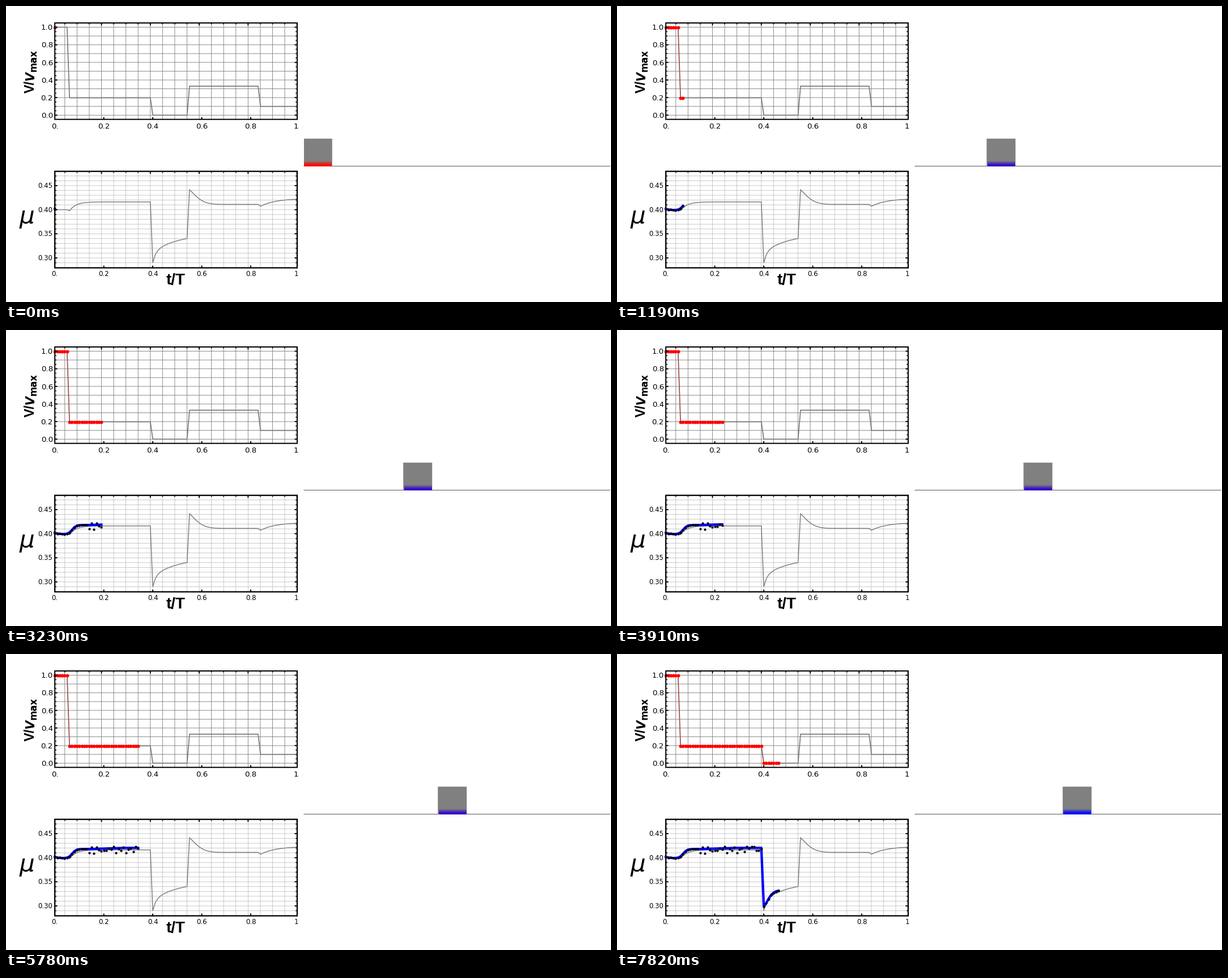
A matplotlib script that plays this animation: 1068x524 px, repeating every 7.99 s.

```python
import numpy as np
import matplotlib.pyplot as plt
from matplotlib.animation import FuncAnimation
from matplotlib.patches import Rectangle

W, H, DPI = 1068, 524, 64
FRAMES, STEP_MS = 47, 170
X0, X1, T_SCALE = 86.2, 514, 4.323      # plot edges, pixels per time step
GRID_X = 103.8 + 21.57 * np.arange(20)
GREY = "#808080"

plt.rcParams["path.snap"] = False       # keep sub-pixel positions


def pt(px):
    return px * 72 / DPI


fig = plt.figure(figsize=(W / DPI, H / DPI), dpi=DPI, facecolor="white")
ax = fig.add_axes([0, 0, 1, 1])
ax.set_xlim(0, W)
ax.set_ylim(H, 0)
ax.axis("off")


def line(x, y, color, width, z, **kw):
    kw.setdefault("solid_capstyle", "butt")
    return ax.plot(x, y, color=color, lw=pt(width), zorder=z, **kw)[0]


def label(x, y, text, size, font="DejaVu Sans", **kw):
    ax.text(x, y, text, fontsize=pt(size), family=font, va="baseline",
            rotation_mode="anchor", zorder=9, **kw)


def time_x(k):
    return X0 + T_SCALE * np.asarray(k)


def speed_y(v):
    return 193.3 - 155.8 * np.asarray(v)


def mu_y(m):
    return 360.6 - 853.4 * (np.asarray(m) - 0.4)


def panel(top, bottom, rows, grid_color, grid_w, frame_w):
    for x in GRID_X[GRID_X < X1]:
        line([x, x], [top, bottom], grid_color, grid_w, 1)
    for y in rows:
        line([X0, X1], [y, y], grid_color, grid_w, 1)
    ax.add_patch(Rectangle((X0, top), X1 - X0, bottom - top, fill=False,
                           ec="black", lw=pt(frame_w), zorder=8))


def ticks(top, bottom, major, minor):
    for ys, size, w in ((major, 4.5, 1.9), (minor, 2.8, 1.5)):
        for y in ys:
            line([X0, X0 + size], [y, y], "black", w, 8)
            line([X1 - size, X1], [y, y], "black", w, 8)
    for i, x in enumerate(GRID_X[GRID_X < X1]):
        size, w = (4.5, 1.9) if i % 4 == 3 else (2.8, 1.5)
        line([x, x], [top, top + size], "black", w, 8)
    for x in time_x([20, 40, 60, 80]):
        line([x, x], [bottom - 4, bottom], "black", 1.9, 8)


def time_labels(y, size):
    for i, text in enumerate(("0.", "0.2", "0.4", "0.6", "0.8")):
        label(time_x(20 * i), y, text, size, ha="center")
    label(512, y, "1", size, ha="center")


# Speed panel
speed_marks = np.arange(0, 1.01, 0.2)
panel(30, 200.7, speed_y(np.arange(0, 1.01, 0.1)), GREY, 0.9, 2)
ticks(30, 200.7, speed_y(speed_marks), speed_y(np.arange(0, 1.01, 0.05)))
time_labels(217, 13.4)
for v in speed_marks:
    label(83, speed_y(v) + 4.8, f"{v:.1f}", 13.4, ha="right")
bold_up = dict(weight="bold", rotation=90)
label(49.5, 154, "V/", 23.5, "Liberation Sans", **bold_up)
label(49.5, 132, "V", 20.7, style="italic", **bold_up)
label(54, 115.5, "max", 16.5, **bold_up)

# Friction panel
mu_marks = np.arange(0.30, 0.451, 0.05)
mu_rows = mu_y(np.arange(0.29, 0.471, 0.01))
panel(292.7, 463.5, mu_rows, "#b4b4b4", 0.7, 2.3)
ticks(292.7, 463.5, mu_y(mu_marks), mu_rows)
time_labels(478.3, 11.7)
for m in mu_marks:
    label(82.5, mu_y(m) + 4.2, f"{m:.2f}", 11.7, ha="right")
label(37, 385.5, "μ", 42, style="italic", ha="center")
label(300, 493.5, "t/T", 27.8, "Liberation Sans", weight="bold", ha="center")

# Reference curves: the friction relaxes after every change of speed
K = np.arange(100)
SPEED_UP = [K < 6, K < 40, K < 55, K < 84]


def since(start):
    return np.maximum(K - start, 0)


def rise(d, tau, power=1):
    return 1 - np.exp(-(d / tau) ** power)


speed = np.select(SPEED_UP, [1, 0.1975, 0, 0.33], 0.1)
d_stop, d_go = since(40), since(55)
mu = np.select(SPEED_UP, [
    0.4,
    0.3978 + 0.0184 * rise(since(6), 2.6),
    0.29 + 0.0215 * rise(d_stop, 1.1) + 0.038 * rise(d_stop, 10),
    0.411 + 0.0307 * np.exp(-d_go / 6 - (d_go / 7) ** 2),
], 0.4071 + 0.0159 * rise(since(84), 6))
line(time_x(K), speed_y(speed), GREY, 1.8, 2)
line(time_x(K), mu_y(mu), GREY, 1.5, 2)

# Smoothed fit and scattered measurements
slide = (0.3988 + 0.003 * np.exp(-K / 1.5)
         + 0.0192 / (1 + np.exp(1.3 * (7.1 - K)))
         + 0.0023 * np.clip((K - 14) / 15, 0, 1))
fit = np.where(K < 40, slide, 0.2985 + 0.034 * rise(d_stop, 2.6, 1.5))
spread = np.where((K > 13) & (K < 40), 0.0042, 0.0007)
noise = np.random.default_rng(4).normal(-0.4, 1, K.size)
samples = fit + spread * np.clip(noise, -3, 0.8)

plot_clip = Rectangle((84, 0), X1 - 84, H, transform=ax.transData)
red_line = line([], [], "red", 1.3, 3, alpha=0.4)
blue_line = line([], [], "blue", 4.3, 3, solid_capstyle="projecting",
                 solid_joinstyle="round")


def dots(color, size, z):
    return ax.plot([], [], "o", color=color, ms=pt(size), mew=0, zorder=z)[0]


red_dots = dots("red", 6, 4)
black_dots = dots("black", 4.2, 4)
for art in (red_line, blue_line, red_dots, black_dots):
    art.set_clip_path(plot_clip)

# Sliding block
BOX, BOX_TOP, FLOOR = 51, 234.8, 284
line([525.5, 1066.5], [283.5, 283.5], "#555555", 1, 1)
track_clip = Rectangle((525.5, 0), 541, H, transform=ax.transData)
block = ax.add_patch(Rectangle((0, BOX_TOP), BOX, FLOOR - BOX_TOP,
                               fc=GREY, lw=0, zorder=3))
glow_rgba = np.zeros((20, 1, 4))
glow_rgba[:, 0, 3] = np.clip(np.linspace(0, 1.25, 20), 0, 1)
glow = ax.imshow(glow_rgba, aspect="auto", interpolation="nearest",
                 extent=(0, BOX, FLOOR, 274), zorder=4)
ax.set_xlim(0, W)
ax.set_ylim(H, 0)
block.set_clip_path(track_clip)
glow.set_clip_path(track_clip)
block_x = 524.8 + 20.6 * (np.cumsum(speed) - speed)


def draw(k):
    n = k + 1
    x = time_x(K[:n])
    for art in (red_line, red_dots):
        art.set_data(x, speed_y(speed[:n]))
    # a short lead-in keeps the line visible from its first point
    y = mu_y(fit[:n])
    blue_line.set_data(np.r_[x[0] - 1, x], np.r_[y[0], y])
    black_dots.set_data(x, mu_y(samples[:n]))

    left = block_x[k]
    block.set_x(left)
    glow_rgba[:, 0, :3] = speed[k], 0, 1 - speed[k]
    glow.set_data(glow_rgba)
    glow.set_extent((left + 1.3, left + BOX - 1.3, FLOOR, 274))
    return red_line, red_dots, blue_line, black_dots, block, glow


anim = FuncAnimation(fig, draw, frames=FRAMES, interval=STEP_MS,
                     repeat=True, repeat_delay=0, blit=False)
plt.show()
```
